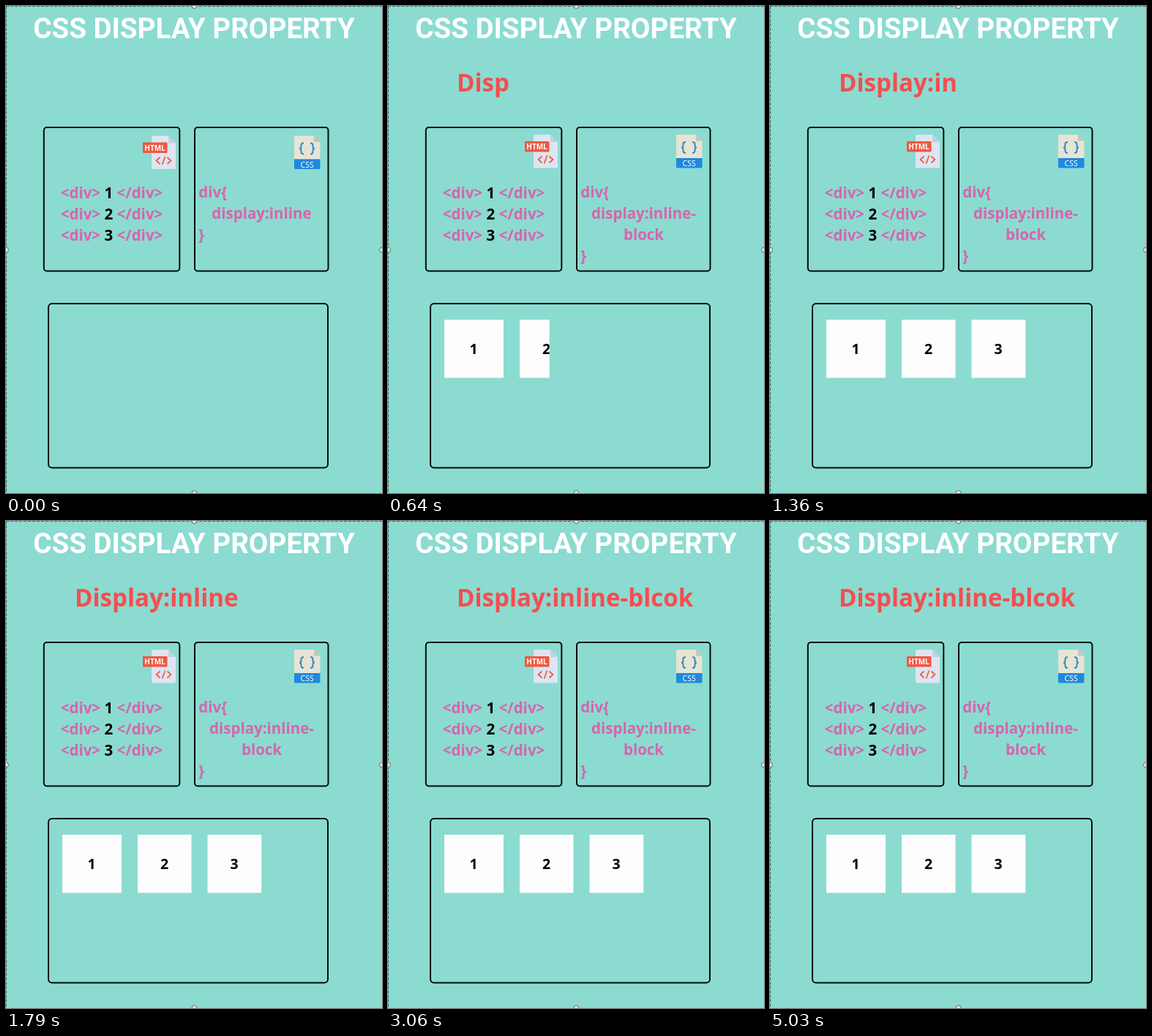
These frames come from a looping animation (514x666 px, 5060 ms). An HTML page:

```html
<!DOCTYPE html>
<html lang="en">
<head>
<meta charset="utf-8">
<title>CSS display property</title>
<style>
  html, body { margin: 0; width: 100%; height: 100%; overflow: hidden; background: #8bdbd1; }
  svg { display: block; width: 514px; height: 666px; }
  text { font-family: "Noto Sans", "Open Sans", sans-serif; font-weight: 700; }
  .title { font: 700 38.6px Roboto, sans-serif; fill: #fff; }
  .heading { font-size: 33.1px; fill: #f64d4f; }
  .code { font-size: 20.5px; fill: #d765ad; }
  .digit { font-size: 19.5px; fill: #000; }
  .mid { text-anchor: middle; }
  .frame { fill: none; stroke: #050b0b; stroke-width: 2; }
  .tag { fill: #fff; text-anchor: middle; }
</style>
</head>
<body>
<svg viewBox="0 0 514 666">
  <defs>
    <clipPath id="wipe"><rect id="wipeRect" x="77" y="420" width="0" height="100"/></clipPath>
  </defs>
  <rect width="514" height="666" fill="#8bdbd1"/>
  <path d="M0 .5H514M.5 0V666" stroke="#47706c" stroke-dasharray="4 2" fill="none"/>
  <g fill="#dfe5e4" stroke="#5d6d6c">
    <circle cx="257.5" cy="0" r="3.5"/><circle cx="257.5" cy="666" r="3.5"/>
    <circle cx="0" cy="333.5" r="3.5"/><circle cx="514" cy="333.5" r="3.5"/>
  </g>
  <text class="title mid" x="257" y="44">CSS DISPLAY PROPERTY</text>
  <text id="heading" class="heading" x="94" y="116.5"></text>

  <rect class="frame" x="51.8" y="166" width="185.5" height="196.5" rx="4"/>
  <rect class="frame" x="258" y="166" width="182.5" height="196.5" rx="4"/>
  <rect class="frame" x="58" y="407" width="382" height="224.5" rx="5"/>

  <g id="icons">
    <path d="M201 176H222L232 186V219.500Q232 221.500 230 221.500H201Q199 221.500 199 219.500V178Q199 176 201 176Z" fill="#dde5f2"/>
    <path d="M222 176L232 186H222Z" fill="#c3cfe2"/>
    <rect x="187" y="185" width="33.500" height="14.500" rx="1" fill="#f0583f"/>
    <text class="tag" x="203.500" y="196" font-size="10">HTML</text>
    <path d="M210.500 205.500L205.500 210L210.500 214.500M220.500 205.500L225.500 210L220.500 214.500M217.500 204.500L213.500 215.500" fill="none" stroke="#ee5a43" stroke-width="1.700"/>
    <path d="M395 176H421L429.500 184.500V208H394V177Z" fill="#e7e4d5"/>
    <path d="M421 176L429.500 184.500H421Z" fill="#cbc3b1"/>
    <path d="M394 208H429.500V220Q429.500 221.500 428 221.500H395.500Q394 221.500 394 220Z" fill="#2188dc"/>
    <text class="tag" x="411.700" y="219" font-size="10.500" style="font-weight:400">CSS</text>
    <path id="brace" d="M407 186Q403.500 186 403.500 189V191Q403.500 193.500 401 193.500Q403.500 193.500 403.500 196V198Q403.500 201 407 201" fill="none" stroke="#2b8fc9" stroke-width="2"/>
    <use href="#brace" transform="translate(823 0) scale(-1 1)"/>
  </g>

  <g id="markup"></g>
  <text class="code" x="263.200" y="262">div{</text>
  <text id="rule" class="code mid" x="349.500" y="291"></text>
  <text id="ruleWrap" class="code mid" x="349.500" y="320"></text>
  <text id="close" class="code" x="263.200">}</text>
  <g id="tiles" clip-path="url(#wipe)"></g>
</svg>
<script>
const LOOP = 5060, SCENE_START = 30;
const HEADING = "Display:inline-blcok";
const TYPE_START = 80, TYPE_STEP = 117;
const WIPE_START = 294, WIPE_SPEED = 216 / 520, WIPE_WIDTH = 272.5;
const $ = id => document.getElementById(id);

$("markup").innerHTML = [1, 2, 3].map((n, i) =>
  `<text class="code mid" x="144.5" y="${263 + i * 29}">&lt;div&gt; <tspan fill="#000">${n}</tspan> &lt;/div&gt;</text>`
).join("");

const tiles = [[77, 81, 117], [180, 73.5, 216.5], [275.5, 74, 312]];
$("tiles").innerHTML = tiles.map(([x, width, center], i) =>
  `<rect x="${x}" y="429" width="${width}" height="79.5" fill="#fdfdfd"/>
   <text class="digit mid" x="${center}" y="476">${i + 1}</text>`
).join("");

const clamp = (v, min, max) => Math.min(max, Math.max(min, v));

function render(t) {
  const wrapped = t >= SCENE_START;
  const typed = clamp(Math.floor((t - TYPE_START) / TYPE_STEP), 0, HEADING.length);
  $("heading").textContent = HEADING.slice(0, typed);
  $("rule").textContent = wrapped ? "display:inline-" : "display:inline";
  $("ruleWrap").textContent = wrapped ? "block" : "";
  $("close").setAttribute("y", wrapped ? 349 : 320);
  $("icons").setAttribute("transform", `translate(0 ${wrapped ? 0 : 1.5})`);
  $("wipeRect").setAttribute("width", clamp((t - WIPE_START) * WIPE_SPEED, 0, WIPE_WIDTH));
}

let start;
function tick(now) {
  start ??= now;
  render((now - start) % LOOP);
  requestAnimationFrame(tick);
}
render(0);
requestAnimationFrame(tick);
</script>
</body>
</html>
```
